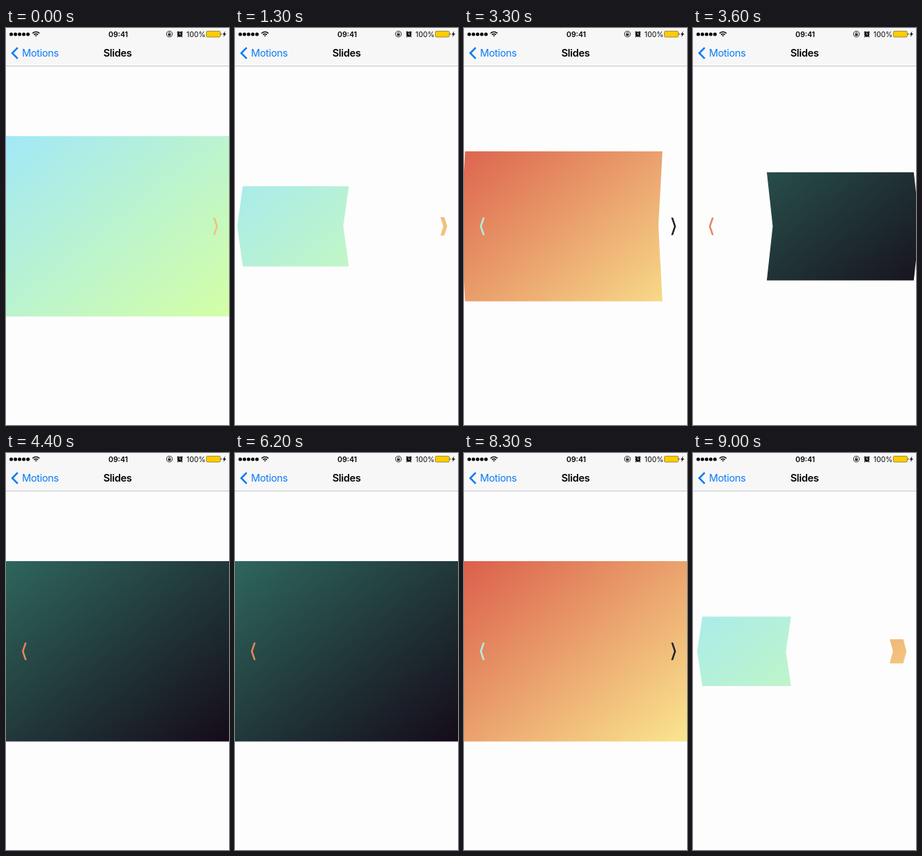
Recreate the animation shown at these times as an HTML page. Size 320 by 569 pixels, loop 9.1 s.

```html
<!DOCTYPE html>
<html lang="en">
<head>
<meta charset="utf-8">
<title>Slides</title>
<style>
  html, body { margin: 0; width: 100%; height: 100%; overflow: hidden; background: #fefdfe; }
  svg { display: block; width: 320px; height: 569px; }
  text { font-family: Inter, Roboto, sans-serif; }
  .bar { font-size: 14.5px; letter-spacing: -.35px; }
  .line { fill: none; stroke: #111; }
</style>
</head>
<body>
<svg viewBox="0 0 320 569">
  <defs id="defs"></defs>
  <g id="slides"></g>

  <rect width="320" height="54" fill="#f8f7f8"/>
  <rect y="54" width="320" height="1" fill="#c6c5c7"/>

  <path d="M7.5 9H36" stroke="#000" stroke-width="5" stroke-linecap="round" stroke-dasharray="0 6"/>
  <g class="line" stroke-width="1.5">
    <path d="M38 7.6Q43 3.4 48 7.6M40 9.7Q43 7.2 46 9.7"/>
    <path d="M41.3 10.6H44.7L43 12.6Z" fill="#111" stroke="none"/>
  </g>
  <text x="161" y="12.6" font-size="10.5" font-weight="600" text-anchor="middle">09:41</text>

  <circle class="line" cx="234.5" cy="8.7" r="4.1" stroke-width=".9"/>
  <rect x="232.6" y="8.2" width="3.8" height="2.9" fill="#111"/>
  <path class="line" d="M233.3 8.4V7.4a1.2 1.2 0 0 1 2.4 0V8.4" stroke-width=".8"/>

  <circle cx="249.5" cy="9" r="3.7" fill="#111"/>
  <path class="line" d="M245.6 6.6L247.6 4.8M253.4 6.6L251.4 4.8M247 12L246 13.2M252 12L253 13.2" stroke-width="1.3"/>
  <path d="M249.5 6.8V9.2H251.3" fill="none" stroke="#f8f7f8" stroke-width=".8"/>

  <text x="259" y="12.6" font-size="10.3">100%</text>
  <rect x="287.5" y="4.5" width="20" height="8.5" rx="1.6" fill="#fc0" stroke="#8a7530" stroke-width=".8"/>
  <path d="M308.4 7.2a1.6 1.6 0 0 1 0 3.1Z" fill="#555"/>
  <path d="M314.6 4.6L310.8 9.4H313L312 13L316 8.1H313.7Z" fill="#111"/>

  <path d="M16.8 28.2L9 36L16.8 43.8" fill="none" stroke="#0a7cf5" stroke-width="2.6"/>
  <text class="bar" x="23" y="41" fill="#0a7cf5">Motions</text>
  <text class="bar" x="160" y="41" font-weight="600" text-anchor="middle">Slides</text>
</svg>

<script>
const LOOP = 9100, STEP = 100;
const WIDTH = 320, HEIGHT = 258.5, MIDDLE = 284.25, SMALL = 25;
const SHRINK = 333, GROW_DELAY = 190, GROW = 850;

// Start time, slide leaving, slide arriving
const moves = [[1108, 0, 1], [3208, 1, 2], [6338, 2, 1], [8708, 1, 0]];
const colors = [['#a2e8f7', '#d4ffa6'], ['#db5f4c', '#fae68f'], ['#2e665c', '#150b19']];

const clamp = x => Math.min(1, Math.max(0, x));
const smooth = x => x * x * (3 - 2 * x);
const easeOut = x => 1 - (1 - x) ** 3;

const defs = document.getElementById('defs');
const group = document.getElementById('slides');
defs.innerHTML = colors.map(([from, to], i) =>
  `<linearGradient id="g${i}" gradientUnits="userSpaceOnUse" x1="0" y1="0" x2="1" y2="1"
    gradientTransform="translate(0 ${MIDDLE - HEIGHT / 2}) scale(${WIDTH} ${HEIGHT})">
    <stop stop-color="${from}"/><stop offset="1" stop-color="${to}"/></linearGradient>`).join('');
group.innerHTML = colors.map((_, i) => `<path fill="url(#g${i})"/>`).join('');
const paths = [...group.children];

// Arrow-shaped mask: a thin chevron at p = 0, the whole slide at p = 1
function arrow(p, onRight) {
  const bulge = p * (1 - p);
  const small = onRight ? 20 : 27;
  const outer = small * (1 - p) - 23 * bulge;
  const inner = (small + 2.7) * (1 - p) + WIDTH * p + (60 + 80 * p) * bulge;
  const skew = 4.2 * (1 - p) + (13 + 25 * p) * bulge;
  const half = (SMALL + (HEIGHT - SMALL) * p) / 2;
  const top = MIDDLE - half, bottom = MIDDLE + half;
  const point = (x, y) => `${onRight ? WIDTH - x : x} ${y}`;
  return 'M' + [
    point(outer, top), point(inner, top), point(inner - skew, MIDDLE),
    point(inner, bottom), point(outer, bottom), point(outer - skew, MIDDLE)
  ].join('L') + 'Z';
}

function draw(time) {
  const [start, from, to] = moves.filter(m => m[0] <= time).pop() || moves[0];
  const elapsed = time - start;
  const size = [0, 0, 0];
  size[from] = 1 - smooth(clamp(elapsed / SHRINK));
  size[to] = easeOut(clamp((elapsed - GROW_DELAY) / GROW));

  const other = 2 - (from + to === 1 ? 0 : 2);
  paths.forEach((path, i) => {
    const onRight = i === 2 || (i === 1 && other === 2);
    path.setAttribute('d', arrow(size[i], onRight));
    path.setAttribute('opacity', i === other ? clamp((size[1] - .5) / .2) : 1);
  });
  // Chevrons lie above the large slide
  [0, 1, 2].sort((a, b) => size[b] - size[a]).forEach(i => group.append(paths[i]));
}

const begin = performance.now();
function tick() {
  const time = (performance.now() - begin) % LOOP;
  draw(Math.floor(time / STEP) * STEP);
  requestAnimationFrame(tick);
}
tick();
</script>
</body>
</html>
```
